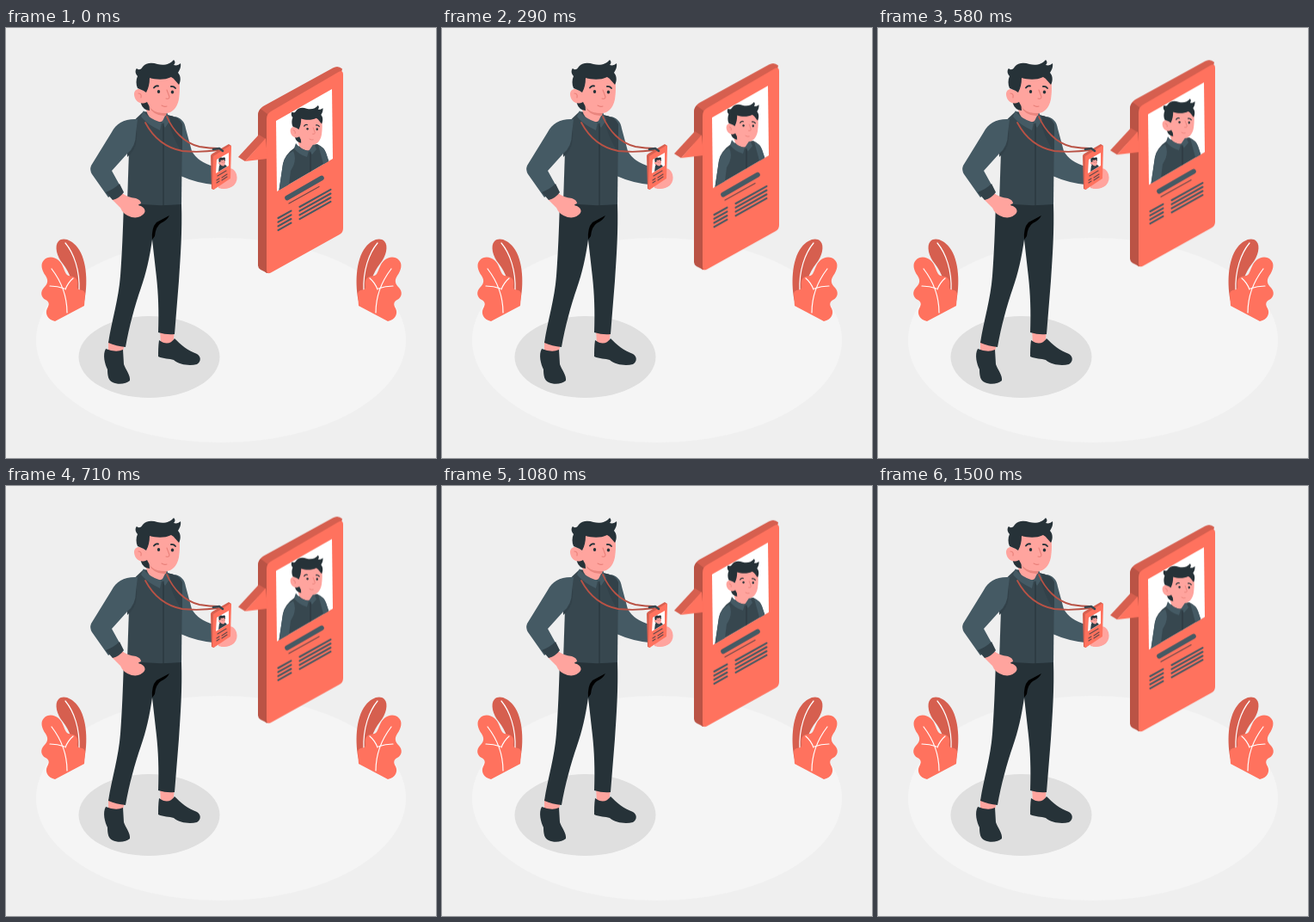
These frames come from a looping animation (500 by 500 pixels, 1540 ms). An HTML page:

```html
<!DOCTYPE html>
<html lang="en">
<head>
<meta charset="utf-8">
<title>ID card</title>
<style>
html, body { margin: 0; width: 100%; height: 100%; overflow: hidden; background: #efefef; }
svg { display: block; width: 100%; height: 100%; }
.coral { fill: #ff725e; }
.deep { fill: #d65f4f; }
.side { fill: #ba5345; }
.skin { fill: #ffa49e; }
.ink { fill: #263238; }
.shirt { fill: #37474f; }
.sleeve { fill: #455a64; }
.seam { fill: #324149; }
.line { fill: none; stroke-linecap: round; stroke-linejoin: round; }
</style>
</head>
<body>
<svg viewBox="0 0 500 500">
  <defs>
    <g id="plant">
      <path class="deep" d="M91 318C95 300 95 270 83 255C76 246 66 243 61 248C56 253 59 266 66 274C74 284 80 300 81 316Z"/>
      <path class="line" stroke="#fff" stroke-width="1.2" d="M69 250C79 262 86 282 85 305"/>
      <path class="coral" d="M57 341C48 339 45 332 48 326C51 321 50 318 46 316C40 313 40 306 44 302C48 298 50 294 46 288C41 281 40 274 44 270C49 265 56 266 61 270C66 274 67 281 70 286C73 290 79 287 82 292C85 297 81 301 84 304C87 305 91 304 92 309L91 323Z"/>
      <path class="line" stroke="#fff" stroke-width="1.2" d="M53 280C63 293 71 311 71 331M51 300Q60 300 68 303M78 291Q72 296 69 304"/>
    </g>
    <g id="head">
      <path class="ink" d="M156 84L166 84L167 96Q159 95 157 88Z"/>
      <path class="skin" d="M165 54L200 55C203 66 202 76 201 83C199 93 193 99 186 99C176 99 167 94 164 86C155 91 149 83 149 77C149 71 155 69 160 73Z"/>
      <path class="ink" d="M167 58Q167 68 163 75L160 73L153 70C151 66 151 60 153 56C150 53 150 49 152 47C155 50 158 47 159 45C163 40 170 40 176 42C184 44 191 42 195 37C197 39 197 41 195 43C198 44 201 43 203 41C204 46 201 50 200 52C204 56 203 63 201 66C198 63 196 59 192 57C184 61 174 60 167 58Z"/>
      <path class="line" stroke="#263238" stroke-width="1.9" d="M172 69.500Q174 66.500 177 67.500M192 68Q195 67.500 197 70"/>
      <ellipse class="ink" cx="177.500" cy="74" rx="1.700" ry="2"/>
      <ellipse class="ink" cx="193.500" cy="74.500" rx="1.700" ry="2"/>
      <path class="line" stroke="#e87f78" stroke-width="1.100" d="M187 72L190 80Q190 83 186 82M181 90Q184 92 187 91M154 76Q158 76 157 81"/>
    </g>
    <clipPath id="photo"><path d="M314 108L379 71L380 152L315 190Z"/></clipPath>
  </defs>

  <ellipse cx="250" cy="363" rx="215" ry="119" fill="#f5f5f5"/>
  <ellipse cx="166.500" cy="382.500" rx="82" ry="47.500" fill="#dfdfdf"/>
  <use href="#plant"/>
  <use href="#plant" transform="matrix(-1 0 0 1 501 0)"/>

  <!-- legs -->
  <path class="skin" d="M119 364L138 367L135 380L119 378ZM179 350L196 352L194 369L180 367Z"/>
  <path class="ink" d="M116 373C112 380 115 391 118 397C118 404 119 410 124 412C130 415 140 414 144 410C145 404 139 397 137 391L136 374Q128 378 116 373ZM178 363C177 370 177 376 177 382C183 385 190 384 195 386C202 392 214 393 222 391C227 388 227 382 222 379C211 375 203 368 196 361Q189 371 178 363Z"/>
  <path class="ink" d="M137 202L204 205C205 235 203 265 201 294L196 356Q187 357 177 354C178 330 177 308 175 290L170 246C167 267 163 285 157 302C150 322 143 348 139 371Q128 370 119 366C123 340 131 315 133 288C135 262 136 235 137 202Z"/>
  <path d="M190 218L175 226Q169 232 170 246L173 242Q174 231 180 227Q187 224 190 218Z" fill="#000"/>

  <!-- right arm and torso -->
  <path class="sleeve" d="M196 103C203 104 208 109 209 117L216 143Q223 156 242 161L241 182Q221 180 203 172Z"/>
  <path class="shirt" d="M160 97Q151 105 144 113L141 203Q172 208 204 205L205 112Q200 103 187 101Z"/>
  <path class="seam" d="M187 101Q202 103 205 112L205 145Q193 128 187 101ZM147 107Q153 112 152 128Q151 142 141 150L140 122Z"/>
  <path class="skin" d="M164 85L187 93L186 105Q180 111 174 109Q165 105 163 95Z"/>
  <path class="sleeve" d="M160 96Q163 104 181 110L179 119Q164 112 157 103ZM187 98L191 107L185 116L181 110Z"/>
  <path class="line" stroke="#263238" stroke-width="1" d="M183 111V206"/>
  <path d="M166 91Q174 101 187 98L186 102Q172 103 166 91Z" fill="#e9857e"/>
  <use href="#head"/>

  <!-- left arm -->
  <path class="skin" d="M123 199L135 192Q141 197 151 198Q157 200 157 204Q151 206 157 207Q163 210 161 215Q156 222 146 220Q136 217 133 209Z"/>
  <path class="sleeve" d="M153 106C138 105 128 111 123 121L99 160Q97 165 100 170L119 197L134 186L123 166L141 146Q151 138 151 123Z"/>
  <path class="seam" d="M116 191Q126 187 132 181L137 191Q132 198 124 200Z"/>

  <!-- lanyard and badge -->
  <path class="line" stroke="#b95245" stroke-width="1.800" d="M162 110C171 127 184 139 205 143Q225 145 247 142M187 103C194 119 207 134 225 138Q237 140 247 140"/>
  <path class="skin" d="M247 181Q255 174 256 165Q264 160 268 170Q270 178 265 183Q257 189 247 186Z"/>
  <path class="deep" d="M238 149Q238 147 240 146L259 135L262 137L242 188L239 187Z"/>
  <path class="coral" d="M241 149L260 137Q262 136 262 138L261 175L243 187Q240 189 240 186Z"/>
  <path class="line" stroke="#37474f" stroke-width="2.600" d="M241 141L248 140L252 143"/>
  <path fill="#fff" d="M245 153L259 145V160L244 169Z"/>
  <path class="seam" d="M247 167L248 160Q251 157 255 159L257 161Z"/>
  <use href="#head" transform="translate(224.600 143.600) scale(.15 .17)"/>
  <path class="line" stroke="#6b4a4b" stroke-width="1.200" d="M246 172L256 166M245 177L248 175M251 174L257 170M245 180L248 178M251 177L257 173"/>
  <path class="skin" d="M257 178Q263 174 266 177Q267 183 259 186L250 187Q252 181 257 178Z"/>

  <!-- floating card -->
  <g id="card">
    <path class="deep" d="M293 276V102Q293 95 299 91L380 46.500Q386 43 391 47.500L388 60L308 284L303 285Z"/>
    <path class="side" d="M293 276V102Q293 97 296 94L304 100V285L296 281Q293 279 293 276Z"/>
    <path class="coral" d="M303 106Q303 100 308 97L386 51.500Q392 48 392 54V233Q392 238 388 240L308 284.500Q303 287 303 281Z"/>
    <path class="deep" d="M270 150L294 124L302 129L278 155Z"/>
    <path class="coral" d="M278 155L302 128L304 152Z"/>
    <path fill="#fff" d="M314 108L379 71L380 152L315 190Z"/>
    <g clip-path="url(#photo)">
      <path class="shirt" d="M317 192L322 158Q324 147 337 138L362 135Q370 139 372 145L377 160Z"/>
      <path class="sleeve" d="M317 192L322 158Q324 148 334 143Q339 154 331 166L328 190Z"/>
      <path class="sleeve" d="M363 136Q370 139 372 145L377 160L369 158Z"/>
      <path class="skin" d="M340 123L357 132V139Q353 144 348 142Q341 140 340 134Z"/>
      <path class="sleeve" d="M337 134Q342 141 352 143L350 150Q340 147 335 140ZM358 134L361 141L356 147L352 143Z"/>
      <path class="line" stroke="#263238" stroke-width=".8" d="M354 144V172"/>
      <use href="#head" transform="translate(226.300 62.600) scale(.7 .74)"/>
    </g>
    <path class="line" stroke="#455a64" stroke-width="5.600" d="M327 197.500L367 174.500"/>
    <path class="line" stroke="#6f4a4b" stroke-width="1.300" d="M329 204L364 184.500"/>
    <g id="rows" class="line" stroke="#455a64" stroke-width="2.100"></g>
  </g>
</svg>
<script>
const rows = document.getElementById('rows');

function addRows(x, y, width) {
  for (let i = 0; i < 4; i++) {
    const path = document.createElementNS('http://www.w3.org/2000/svg', 'path');
    path.setAttribute('d', `M${x} ${y + i * 4.7}l${width} ${-width * 0.56}`);
    rows.append(path);
  }
}
addRows(316.5, 221, 15);
addRows(341.5, 208, 36);

const LOOP = 1540;
const steps = [[0, 0], [740, -9.8], [1510, 0.4], [LOOP, 0]];
document.getElementById('card').animate(
  steps.map(([t, y]) => ({ offset: t / LOOP, transform: `translateY(${y}px)` })),
  { duration: LOOP, iterations: Infinity }
);
</script>
</body>
</html>
```
